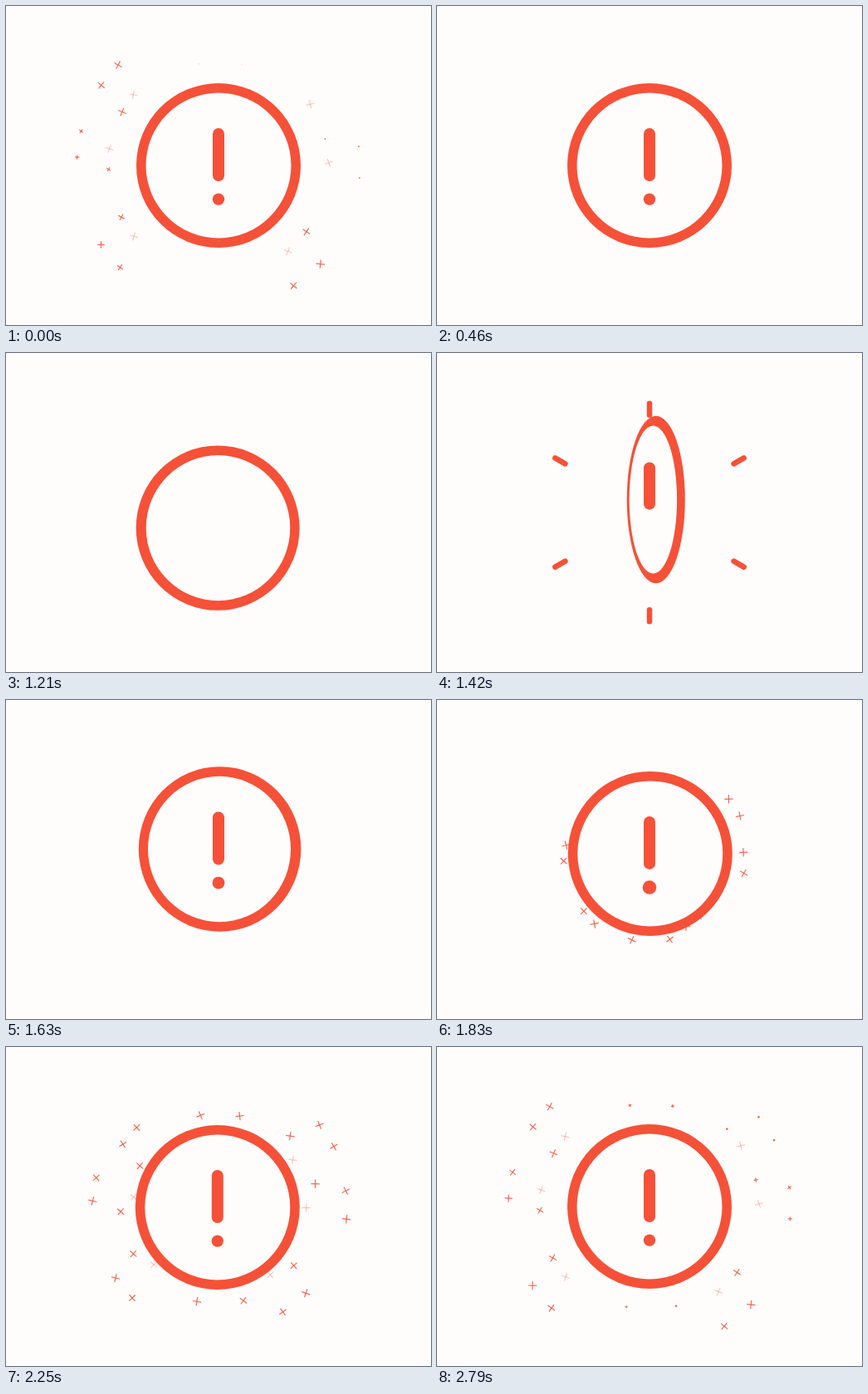
An HTML page with a canvas for the animation above (2830 ms loop, 512 px wide and 384 px high).

```html
<!DOCTYPE html>
<html lang="en">
<head>
<meta charset="utf-8">
<title>Alert</title>
<style>
  html, body { margin: 0; width: 100%; height: 100%; overflow: hidden; background: #fffdfc; }
  canvas { display: block; width: 512px; height: 384px; }
</style>
</head>
<body>
<canvas id="stage" width="512" height="384"></canvas>
<script>
const ctx = document.getElementById('stage').getContext('2d');
const LOOP = 2830, START = 1000, SETTLE = 2790;
const RED = '#f55138', PAPER = '#fffdfc';

const clamp = v => Math.max(0, Math.min(1, v));
const span = (t, a, b) => clamp((t - a) / (b - a));
const mix = (a, b, p) => a + (b - a) * p;
const outQuad = p => 1 - (1 - p) ** 2;
const outCubic = p => 1 - (1 - p) ** 3;
const smooth = p => p * p * (3 - 2 * p);
const rad = deg => deg * Math.PI / 180;

// Sparks fly out in fans, alternating near and far; the third of each is late and pale
function fan(from, to, lead, count = 4) {
  return Array.from({ length: count }, (_, i) => {
    const a = rad(mix(from, to, i / (count - 1)));
    const far = count === 4 && i % 2;
    const r = far ? 170 : count === 4 ? 132 : 124;
    const pale = i === 2;
    return {
      x: 256 + r * Math.cos(a),
      y: 192 + r * Math.sin(a),
      lead: pale ? lead - .11 : lead,
      alpha: pale ? .3 : .85,
      tilt: (from * 7 + i * 17) % 45
    };
  });
}

const sparks = [
  fan(-45, -28, .925), fan(-14, 5, .91), fan(37, 58, .86),
  fan(152, 134, .88), fan(178, 194, .893), fan(209, 225, .82),
  fan(-101, -77, .915, 2), fan(75, 103, .935, 2)
].flat();

function ellipse(x, y, rx, ry, color) {
  ctx.fillStyle = color;
  ctx.beginPath();
  ctx.ellipse(x, y, Math.max(0, rx), ry, 0, 0, Math.PI * 2);
  ctx.fill();
}

function line(x1, y1, x2, y2) {
  ctx.beginPath();
  ctx.moveTo(x1, y1);
  ctx.lineTo(x2, y2);
  ctx.stroke();
}

function drawSpark({ x, y, lead, alpha, tilt }, t) {
  const rest = (1 - lead) * (Math.exp((SETTLE - t) / 380) - 1) / 3.14;
  const life = Math.min(480, 30 + Math.max(0, .92 - lead) * 2500);
  const half = 5.2 * clamp((SETTLE + life - t) / 110);
  if (rest > .9 || half <= 0) return;
  ctx.save();
  ctx.globalAlpha = alpha;
  ctx.translate(mix(x, 256, rest), mix(y, 212, rest));
  ctx.rotate(rad(tilt + 100 * rest));
  line(-half, 0, half, 0);
  line(0, -half, 0, half);
  ctx.restore();
}

function drawSparks(t) {
  if (t < 1580) return;
  ctx.strokeStyle = RED;
  ctx.lineCap = 'butt';
  ctx.lineWidth = 1.2;
  sparks.forEach(s => drawSpark(s, t));
}

function drawRays(t) {
  if (t < 1300 || t >= 1600) return;
  const tip = mix(80, 148, outQuad(span(t, 1300, 1540)));
  const tail = tip - 14 * span(t, 1300, 1390) * (1 - span(t, 1500, 1600));
  ctx.strokeStyle = RED;
  ctx.lineCap = 'round';
  ctx.lineWidth = 6.5 * (1 - span(t, 1540, 1600));
  for (let deg = 30; deg < 390; deg += 60) {
    const c = Math.cos(rad(deg)), s = Math.sin(rad(deg));
    line(256 + c * tail, 192 + s * tail, 256 + c * tip, 192 + s * tip);
  }
}

function drawRing(x, y, t) {
  const turn = 2 * Math.PI * (1 - span(t, START, 1750)) ** 2;
  const c = Math.max(.06, Math.abs(Math.cos(turn))), s = Math.sin(turn);
  const side = Math.abs(s), grow = 1 + .018 * side;
  const shift = Math.sign(s) * Math.min(3.6 * side, 10 * c);
  const cx = x + 8.3 * s;
  ellipse(cx, y, 99 * c, 99 * grow, RED);
  ellipse(cx - shift, y, 87.5 * c - 2.4 * side, 87.5 * grow, PAPER);
}

function drawMark(x, y, t) {
  const h = 64 * outQuad(span(t, 1300, 1480));
  if (h > 0) {
    ctx.fillStyle = RED;
    ctx.beginPath();
    ctx.roundRect(x - 7, y - 45, 14, h, Math.min(7, h / 2));
    ctx.fill();
  }
  const r = t < 1720 ? 8.6 * outQuad(span(t, 1480, 1720))
                     : mix(8.6, 7.2, smooth(span(t, 1720, 2100)));
  ellipse(x, y + 40.6, r, r, RED);
}

function center(t) {
  if (t < 1400) return [256, mix(500, 176.5, outCubic(span(t, START, 1400)))];
  const back = smooth(span(t, 2250, 2560));
  const y = mix(176.5, 193, smooth(span(t, 1400, 2250))) - back;
  const x = 256 + .8 * smooth(span(t, 1500, 1830)) - 2 * smooth(span(t, 1830, 2250)) + 1.2 * back;
  return [x, y];
}

function draw(now) {
  let t = now % LOOP;
  if (t < START) t += LOOP;
  ctx.fillStyle = PAPER;
  ctx.fillRect(0, 0, 512, 384);
  const [x, y] = center(t);
  drawSparks(t);
  drawRing(x, y, t);
  drawRays(t);
  drawMark(Math.min(x, 256), y, t);
}

const begin = performance.now();
function tick() {
  draw(performance.now() - begin);
  requestAnimationFrame(tick);
}
tick();
</script>
</body>
</html>
```
